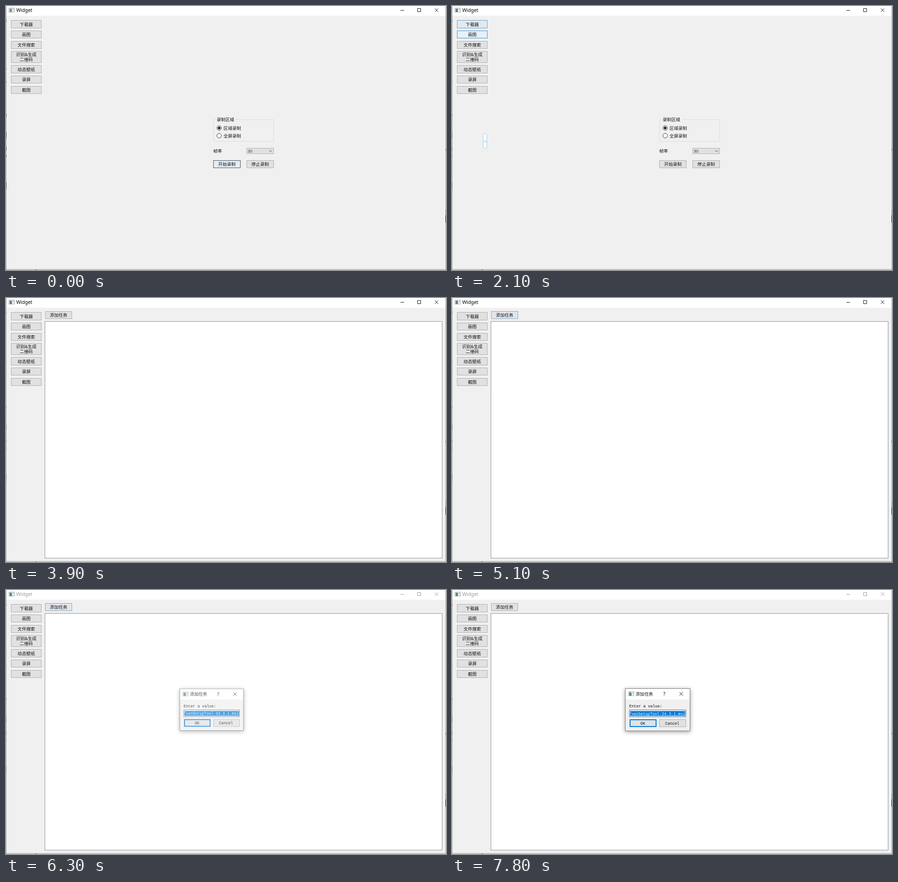
Recreate the animation shown at these times as an HTML page. Size 966 by 580 pixels, loop 8000 ms.

```html
<!DOCTYPE html>
<html lang="zh">
<head>
<meta charset="utf-8">
<title>Widget</title>
<style>
  html, body { margin: 0; width: 100%; height: 100%; overflow: hidden; background: #f0f0f0; }
  svg { display: block; }
  text { font: 9.6px "Noto Sans CJK SC", "Noto Sans CJK", sans-serif; fill: #111; white-space: pre; }
  .mid { text-anchor: middle; }
  .title { font: 10.5px "Noto Sans", "Open Sans", sans-serif; fill: #000; }
  .mono { font: 8.6px "Liberation Mono", monospace; }
  .num { font: 9.4px "Liberation Sans", sans-serif; fill: #333; }
  .line { fill: none; stroke: #111; }
  .off .title { fill: #999; }
  .off .line { stroke: #999; }
  .shadow { filter: drop-shadow(0 2px 5px rgba(0, 0, 0, .38)); }
</style>
</head>
<body>
<svg id="stage" width="966" height="580" viewBox="0 0 966 580"></svg>
<script>
const LOOP = 8000;
const stage = document.getElementById('stage');

const rect = (x, y, w, h, fill, stroke = 'none', more = '') =>
  `<rect x="${x}" y="${y}" width="${w}" height="${h}" fill="${fill}" stroke="${stroke}" ${more}/>`;
const text = (x, y, s, cls = '') => `<text x="${x}" y="${y}" class="${cls}">${s}</text>`;
const path = (d, more = '') => `<path class="line" d="${d}" ${more}/>`;
const button = (id, x, y, w, h, ...lines) =>
  `<g id="${id}">` + rect(x, y, w, h, '#e1e1e1', '#adadad') +
  lines.map((s, i) => text(x + w / 2, y + h / 2 + 3.6 + (i - (lines.length - 1) / 2) * 10.7, s, 'mid')).join('') +
  '</g>';
const icon = (x, y) =>
  rect(x + .5, y + .5, 12, 9, '#eef0f2', '#a9afb4') +
  rect(x + 2, y + 2, 5, 7, '#4d8a86', 'none', 'class="pane"') +
  rect(x + 9, y + 2, 2, 3, '#b9bfc4');
const radio = (y, on, label) =>
  `<circle cx="468" cy="${y}" r="5" fill="#fff" stroke="#333"/>` +
  (on ? `<circle cx="468" cy="${y}" r="3" fill="#222"/>` : '') + text(477.6, y + 3.6, label);

const menu = [
  ['load', 31.5, 17, '下载器'], ['draw', 54.5, 16, '画图'], ['find', 77.5, 16, '文件搜索'],
  ['code', 99.5, 25, '识别&amp;生成', '二维码'], ['wall', 130.5, 17, '动态壁纸'],
  ['tape', 153.5, 16, '录屏'], ['snap', 176.5, 16, '截图']
];
const leftMarks = [[30, 5], [137, 2], [165, 3], [237, 6], [277, 14], [310, 8], [327, 5], [387, 15]];

const chrome =
  rect(0, 0, 966, 580, '#f0f0f0') + rect(0, 0, 966, 21.5, '#fff') +
  rect(0, 0, 1, 580, '#a6a6a6') + rect(965, 0, 1, 580, '#a6a6a6') +
  rect(0, 578.5, 966, 1, '#7c7c7c') + rect(0, 579.5, 966, .5, '#ddd') + rect(65, 579, 2, 1, '#333') +
  `<g id="marks">${leftMarks.map(([y, h]) => rect(0, y, 1, h, '#333')).join('')}</g>` +
  rect(965, 313, 1, 5, '#555') + rect(965, 447, 1, 13, '#777') + rect(965, 460, 1, 16, '#000') +
  '<g id="bar">' + icon(6, 4) + text(22.5, 13, 'Widget', 'title') +
  path('M866 9.5h8M903.5 5.5h7v7h-7z') + path('M941.5 5.5l7.5 7.5m0-7.5l-7.5 7.5') + '</g>';

const recorder = '<g id="recorder">' +
  path('M460 249.5H455.5V297.5H587.5V249.5H504', 'style="stroke:#dcdcdc"') +
  text(462.5, 252.6, '录制区域') + radio(268, true, '区域录制') + radio(285, false, '全屏录制') +
  text(455, 322, '帧率') + rect(528.5, 312.5, 59, 12, '#e1e1e1', '#adadad') +
  text(530.5, 322, '30', 'num') + path('M577.5 317l3.2 3.2 3.2-3.2', 'style="stroke:#444"') +
  button('start', 455.5, 339.5, 59, 16, '开始录制') +
  button('stop', 528.5, 339.5, 59, 16, '停止录制') + '</g>';

const downloads = '<g id="downloads">' + button('add', 86.5, 29.5, 58, 16, '添加任务') +
  rect(85.5, 51.5, 872, 520, '#fff', '#8b8f96') + '</g>';

const handle = '<g id="handle">' +
  rect(68.5, 280.5, 8, 32, '#fcfeff', '#8ecdf3', 'rx="3"') +
  path('M69 296.5h7M69 298.5h7', 'style="stroke:#9bd3f5"') + '</g>';

const dialog = '<g id="dialog">' +
  rect(380.5, 216.5, 142, 93, '#f0f0f0', '#777', 'class="shadow"') + rect(381, 217, 141, 23.5, '#fff') +
  icon(387, 223) + text(403, 232, '添加任务') + text(466, 232.3, '?', 'title mid') +
  path('M499.5 224.5l7.5 7.5m0-7.5l-7.5 7.5') +
  text(389, 257.5, 'Enter a value:', 'mono') +
  rect(389.5, 263.5, 124, 15, '#fff', '#2a6fae') + rect(391, 266, 121, 10.5, '#0078d7') +
  '<clipPath id="field"><rect x="391" y="264" width="121" height="14"/></clipPath>' +
  '<g clip-path="url(#field)"><text x="512" y="274.5" class="mono" text-anchor="end" style="fill:#fff">/vanSetupTool-24.3.1.msi</text></g>' +
  rect(511, 266, 1, 10.5, '#222', 'none', 'id="caret"') +
  rect(391, 285, 57, 15, '#e1e1e1', '#0078d7', 'stroke-width="2"') + text(419, 296, 'OK', 'mono mid') +
  rect(455.5, 284.5, 58, 16, '#e1e1e1', '#adadad') + text(483.5, 296, 'Cancel', 'mono mid') + '</g>';

stage.innerHTML = chrome + recorder + downloads +
  menu.map(([id, y, h, ...lines]) => button(id, 11.5, y, 66, h, ...lines)).join('') + handle + dialog;

// fill, border, label
const looks = {
  plain: ['#e1e1e1', '#adadad', '#111'],
  hint: ['#e2e6ea', '#88a5be', '#111'],
  warm: ['#e3e9ee', '#6b9dc4', '#111'],
  hot: ['#e5f1fb', '#3a8fd0', '#111'],
  focus: ['#e3eef8', '#414b57', '#111'],
  down: ['#cce4f7', '#2b6a9c', '#111'],
  flash: ['#f9f9f9', '#6a6a6a', '#111'],
  ghost: ['#cad5de', '#cad5de', '#8794a0']
};
const tracks = {
  start: [[0, 'focus'], [300, 'hint'], [600, 'plain']],
  draw: [[0, 'plain'], [1200, 'hint'], [1500, 'hot'], [2400, 'hint'], [2700, 'plain']],
  load: [[0, 'plain'], [1800, 'hint'], [2100, 'warm'], [2400, 'hot'], [3000, 'flash'], [3300, 'hint'], [3600, 'plain']],
  add: [[0, 'plain'], [3000, 'ghost'], [3300, 'plain'], [5100, 'hint'], [5400, 'warm'], [5700, 'hot'], [6000, 'down'], [6300, 'hint'], [6600, 'plain']]
};
const paneSteps = [[0, '#8c8c8c'], [900, '#4d8a86'], [3000, '#71808e'], [3900, '#4d8a86']];
const dialogSteps = [[0, 0], [6300, .7], [6600, 1]];

const el = id => document.getElementById(id);
const at = (steps, t) => steps.findLast(s => s[0] <= t)[1];
const show = (id, on) => { el(id).style.display = on ? '' : 'none'; };

function paint(id, look) {
  const [fill, stroke, label] = looks[look];
  const box = el(id).querySelector('rect');
  box.setAttribute('fill', fill);
  box.setAttribute('stroke', stroke);
  el(id).querySelector('text').style.fill = label;
}

function render(t) {
  for (const id in tracks) paint(id, at(tracks[id], t));
  show('recorder', t < 3000);
  show('downloads', t >= 3000);
  show('handle', t >= 1200 && t < 3600);
  show('caret', t < 6600);
  el('marks').style.opacity = t < 300 ? .9 : .4;
  el('bar').setAttribute('class', t >= 6300 ? 'off' : '');
  el('bar').querySelector('.pane').setAttribute('fill', at(paneSteps, t));
  const k = at(dialogSteps, t);
  show('dialog', k > 0);
  el('dialog').style.opacity = k;
  el('dialog').setAttribute('transform', k < 1 ? 'translate(451.5 263) scale(.985) translate(-451.5 -263)' : '');
}

function tick() {
  render(performance.now() % LOOP);
  requestAnimationFrame(tick);
}
tick();
</script>
</body>
</html>
```
